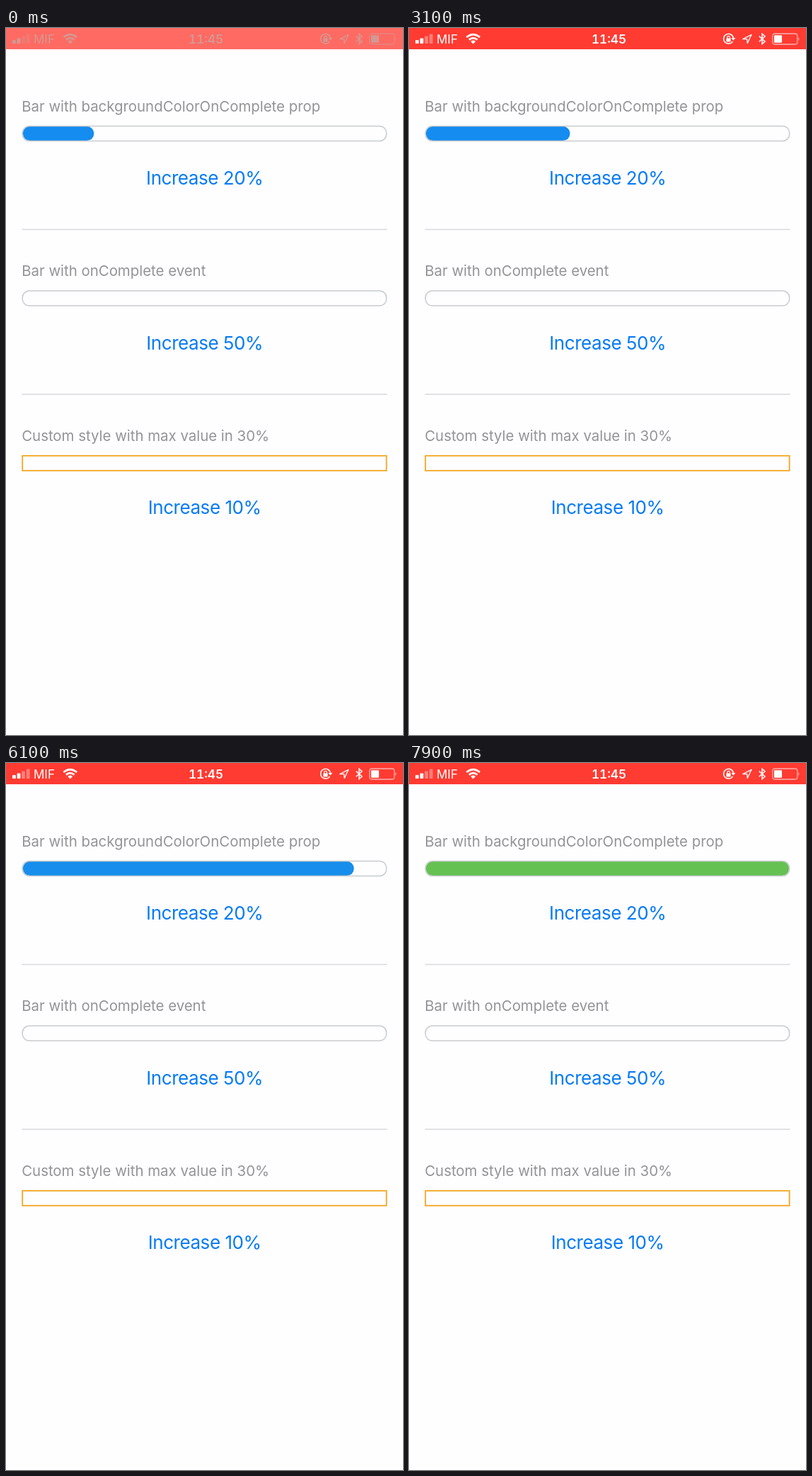
Animation, 561 px wide and 998 px high, one loop 8 s. Source, as an HTML page:

```html
<!DOCTYPE html>
<html lang="en">
<head>
<meta charset="utf-8">
<title>Progress bars</title>
<style>
  html, body { margin: 0; width: 100%; height: 100%; overflow: hidden; background: #fefdff; }
  svg { display: block; width: 100vw; height: 100vh; font-family: Inter, Roboto, sans-serif; }
  .label { font-size: 20.4px; fill: #949497; }
  .button { font-size: 26px; letter-spacing: -.45px; fill: #057bf5; text-anchor: middle; }
  .clock { font-size: 17.2px; font-weight: 600; font-variant-numeric: tabular-nums; text-anchor: middle; }
  .track { fill: none; stroke: #c8ccce; stroke-width: 1.5; }
  .custom { stroke: #f2a71f; stroke-width: 1.8; }
  .rule { fill: #dbdbe0; }
  .line { fill: none; stroke: currentColor; }
</style>
</head>
<body>
<svg viewBox="0 0 561 998">
  <rect id="status" width="561" height="30"/>
  <g id="icons" fill="currentColor" font-size="17">
    <rect x="9" y="17" width="4.8" height="5" rx="1"/>
    <rect x="15.6" y="14.5" width="4.8" height="7.5" rx="1"/>
    <g opacity=".35">
      <rect x="22.2" y="11.5" width="4.8" height="10.5" rx="1"/>
      <rect x="28.8" y="8.5" width="4.8" height="13.5" rx="1"/>
    </g>
    <text x="39" y="21.7">MIF</text>
    <path d="M90.7 22.5 L87.3 19 Q90.7 16.2 94.1 19 Z"/>
    <path class="line" stroke-width="2.7" d="M84.9 16.6 Q90.7 11.8 96.5 16.6 M81.3 13 Q90.7 5.2 100.1 13"/>
    <text class="clock" x="282.5" y="21.7">11:45</text>
    <path class="line" stroke-width="1.5" d="M457.4 18.8 A6.9 6.9 0 1 1 458.4 14.5"/>
    <path d="M455.2 14 H461.4 L458.3 17.6 Z"/>
    <rect x="448.4" y="14.4" width="6.2" height="5" rx=".7"/>
    <path class="line" stroke-width="1.2" d="M449.7 15 V13.2 A1.8 1.8 0 0 1 453.3 13.2 V15"/>
    <path class="line" stroke-width="1.3" stroke-linejoin="round" d="M484 9.3 L471.8 15.6 H477.6 L478.2 21.4 Z"/>
    <path class="line" stroke-width="1.5" d="M494.8 11.6 L503 19 L499 22.6 V8.2 L503 11.8 L494.8 19.3"/>
    <rect class="line" x="513.8" y="8" width="35" height="15" rx="3.2" stroke-width="1.3" opacity=".6"/>
    <rect x="516" y="10.2" width="11" height="10.6" rx="1"/>
    <path d="M550.3 13 Q552.6 15.5 550.3 18 Z" opacity=".6"/>
  </g>
  <g id="page"></g>
</svg>
<script>
const LOOP = 8000, FRAME = 100, PITCH = 232.7;
const TAPS = [2550, 3850, 4880, 5820];
const FILL_TIME = 500, COLOR_START = 5850, COLOR_TIME = 2500;
const BLUE = [20, 140, 240], GREEN = [108, 198, 68];
const $ = id => document.getElementById(id);

const sections = [
  ["Bar with backgroundColorOnComplete prop", "Increase 20%"],
  ["Bar with onComplete event", "Increase 50%"],
  ["Custom style with max value in 30%", "Increase 10%"]
];

$("page").innerHTML = sections.map(([label, button], i) => `
  <g transform="translate(0 ${i * PITCH})">
    <text class="label" x="22.2" y="117.5">${label}</text>
    ${i ? "" : '<rect id="fill" x="23.8" y="138.8" height="20.3" rx="10"/>'}
    <rect class="track ${i > 1 ? "custom" : ""}" x="23.2" y="138.4" width="514.4" height="21"
      rx="${i > 1 ? 0 : 9.5}"/>
    <text class="button" x="280.7" y="221">${button}</text>
    ${i < 2 ? '<rect class="rule" x="22.5" y="283.6" width="516" height="1.6"/>' : ""}
  </g>`).join("");

const firstButton = document.querySelector(".button");
const clamp = v => Math.min(1, Math.max(0, v));
const mix = (a, b, p) => `rgb(${a.map((v, i) => v + (b[i] - v) * p)})`;
const ease = p => p < .5 ? (2 * p) ** 1.75 / 2 : 1 - (2 - 2 * p) ** 1.75 / 2;

// A tap dims the caption at once, then it fades back.
function captionOpacity(t) {
  const tap = TAPS.filter(s => t >= s - 60).pop();
  return tap === undefined ? 1 : .2 + .8 * ease(clamp((t - tap - 30) / 250));
}

function draw(t) {
  const intro = clamp(t / 400);
  $("status").setAttribute("fill", mix([255, 106, 99], [255, 59, 50], intro));
  $("icons").style.color = mix([212, 152, 146], [255, 255, 255], intro);

  const value = TAPS.reduce((sum, s) => sum + .2 * clamp((t - s) / FILL_TIME), .2);
  $("fill").setAttribute("width", 516 * value - 2.7);
  $("fill").setAttribute("fill", mix(BLUE, GREEN, ease(clamp((t - COLOR_START) / COLOR_TIME))));
  firstButton.setAttribute("opacity", captionOpacity(t));
}

const start = performance.now();
function tick() {
  const t = (performance.now() - start) % LOOP;
  draw(Math.floor(t / FRAME) * FRAME);
  requestAnimationFrame(tick);
}
tick();
</script>
</body>
</html>
```
